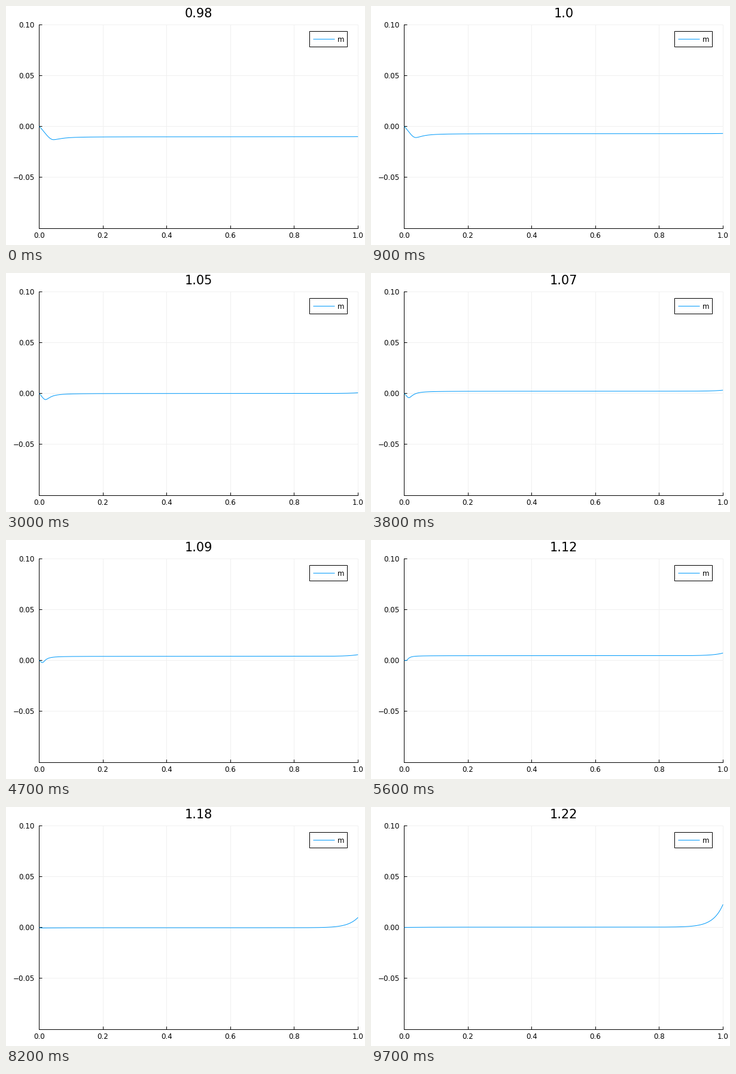
A matplotlib script that plays this animation: 600x400 px, repeating every 9800 ms.

```python
import numpy as np
import matplotlib.pyplot as plt
from matplotlib.animation import FuncAnimation
from matplotlib.patches import Rectangle

W, H, DPI = 600, 400, 100
FRAMES, INTERVAL = 98, 100
PT = 72 / DPI  # points per pixel
BLUE, GRID = "#009afa", "#f0f0f0"
LEFT, RIGHT, TOP, BOTTOM = 55.5, 588.3, 31.2, 372.0

plt.rcParams["font.family"] = "DejaVu Sans"


def px(x):
    return LEFT + x * (RIGHT - LEFT)


def py(y):
    return TOP + (0.1 - y) / 0.2 * (BOTTOM - TOP)


def center(p):
    """Middle of the pixel that holds p, for crisp lines."""
    return np.floor(p) + 0.5


def plateau(i):
    """Straight climb to zero, one half wave, then a slow drift."""
    z = (i - 30) / 51
    wave = 0.0047 * np.sin(np.pi * np.clip(z, 0, 1.02))
    return wave + 0.0172 * min(z, 0) + 4e-5 * max(i - 82, 0)


def curve(x, i):
    level = plateau(i)
    dip_x = max(0.045 * (1 - i / 90) ** 2, 0.001)
    dip_y = -0.013 * max(1 - i / 56, 0)
    rise = 0.0223 * np.exp(0.0525 * (i - FRAMES + 1))

    s = np.clip(x / dip_x, 0, 1)
    fall = dip_y * (0.6 * np.sin(np.pi / 2 * s) + 0.4 * s * s * (3 - 2 * s))
    r = np.maximum(x / dip_x - 1, 0)
    recover = level + (dip_y - level) / (1 + (0.5 + 30 * dip_x) * r ** 1.7)
    lag = 0.0003 * np.clip((i - 47) / 15, 0, 1)
    tail = lag * np.exp(-x / 0.06) * (1 - np.exp(-x / 0.003))
    return np.where(x < dip_x, fall, recover) - tail + rise * np.exp(32 * (x - 1))


fig = plt.figure(figsize=(W / DPI, H / DPI), dpi=DPI, facecolor="white")
ax = fig.add_axes([0, 0, 1, 1])
ax.set_xlim(0, W)
ax.set_ylim(H, 0)
ax.axis("off")


def line(xs, ys, color="black", z=2):
    return ax.plot(xs, ys, color=color, lw=PT, zorder=z, snap=False,
                   solid_capstyle="butt")[0]


def label(x, y, text, size=11.9, ha="center"):
    return ax.text(x, y, text, fontsize=size * PT, ha=ha, va="baseline",
                   color="black", zorder=6)


left, right, top, bottom = (center(p) for p in (LEFT, RIGHT, TOP, BOTTOM))

for k in range(6):
    x = center(px(k / 5))
    line([x, x], [top, bottom], GRID, z=1)
    line([x, x], [bottom, bottom - 5])
    label(px(k / 5), 388, f"{k / 5:.1f}")

for k in range(-1, 3):
    y = center(py(k / 20))
    line([left, right], [y, y], GRID, z=1)
    line([left, left + 5], [y, y])
    label(48, y + 4.5, f"{k / 20:.2f}".replace("-", "\u2212"), ha="right")

line([left, left], [top - 0.5, bottom + 0.5])
line([left - 0.5, right + 0.5], [bottom, bottom])

# Legend
ax.add_patch(Rectangle((507.5, 42.5), 63, 26, fc="white", ec="black",
                       lw=PT, zorder=4, snap=False))
line([513.5, 549.5], [55.5, 55.5], BLUE, z=5)
label(553.6, 60, "m", ha="left")

title = label(322, 19, "", 20.9)
xs = np.linspace(0, 1, 801)
graph = line([], [], BLUE, z=3)


def update(i):
    title.set_text(str(round(97.5 + 0.25 * i) / 100))
    graph.set_data(px(xs), py(curve(xs, i)))
    return title, graph


anim = FuncAnimation(fig, update, frames=FRAMES, interval=INTERVAL,
                     repeat=True, repeat_delay=0)
plt.show()
```
